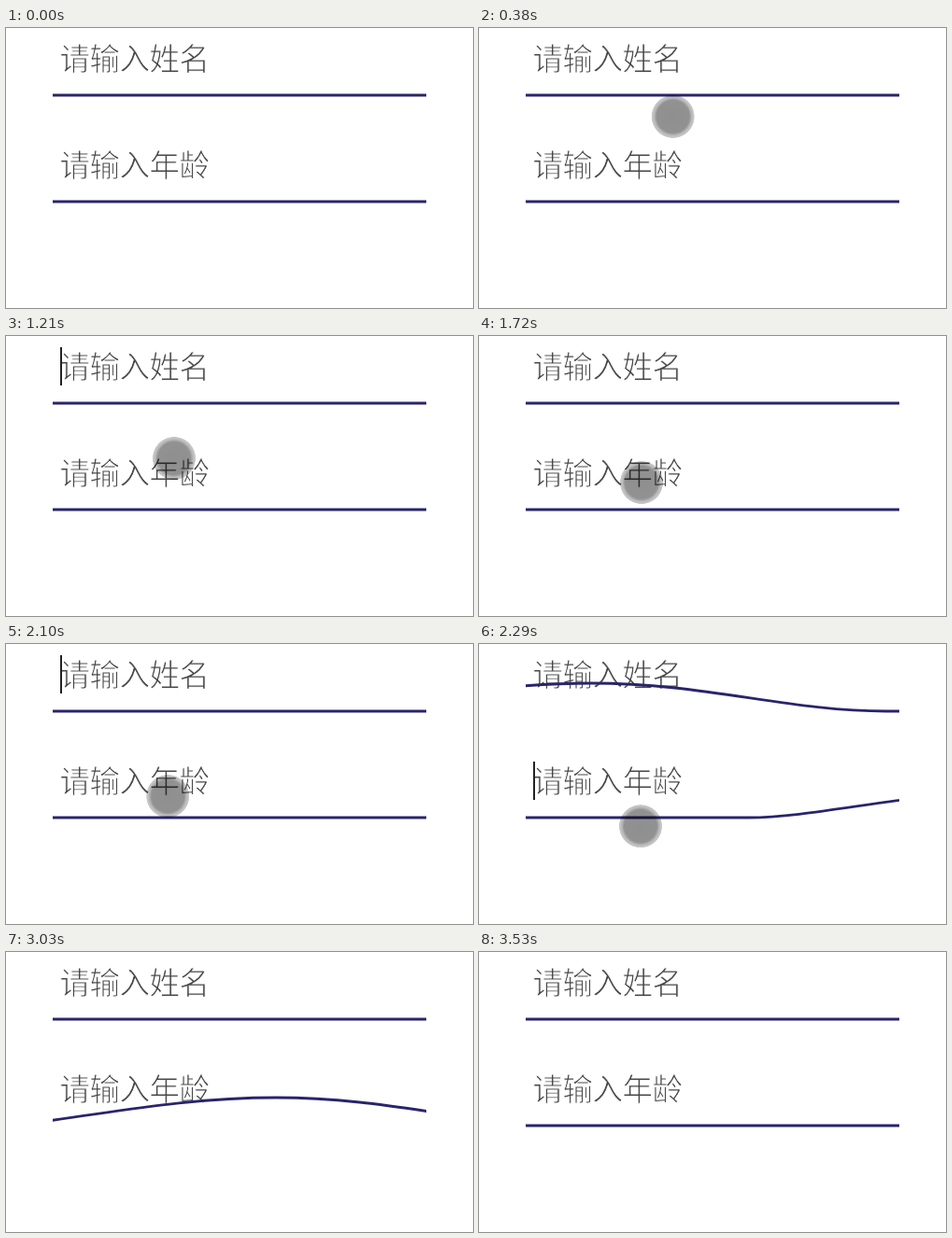
An HTML page for the animation above (3.71 s loop, 500 by 300 pixels).

```html
<!DOCTYPE html>
<html lang="zh-CN">
<head>
<meta charset="utf-8">
<title>Wave inputs</title>
<style>
  html, body { margin: 0; width: 100%; height: 100%; overflow: hidden; background: #fff; }
  svg { display: block; }
  /* The white outline thins the glyphs to a light weight. */
  text {
    font: 300 32.6px "Noto Sans CJK SC", "Noto Sans CJK", sans-serif;
    letter-spacing: -.6px; fill: #484848; stroke: #fff; stroke-width: .9px;
  }
  .wave { fill: none; stroke: #29246c; stroke-width: 1; }
  .caret { fill: #222; }
</style>
</head>
<body>
<svg width="500" height="300" viewBox="0 0 500 300">
  <defs>
    <radialGradient id="spot">
      <stop offset="0" stop-opacity=".44"/>
      <stop offset=".75" stop-opacity=".43"/>
      <stop offset=".87" stop-opacity=".27"/>
      <stop offset=".97" stop-opacity=".21"/>
      <stop offset="1" stop-opacity="0"/>
    </radialGradient>
    <path id="bump" d="M0,0H399.3C448.3,0 514,-10.5 597,-10.5C674.3,-10.5 732,0 798,0H1200"/>
  </defs>
  <g class="field">
    <text x="57.6" y="44.8">请输入姓名</text>
    <rect class="caret" x="58" y="12" width="2" height="41"/>
    <svg x="50" width="400" height="300"><use class="wave" href="#bump"/></svg>
  </g>
  <g class="field" transform="translate(0 114)">
    <text x="57.6" y="44.8">请输入年龄</text>
    <rect class="caret" x="58" y="12" width="2" height="41"/>
    <svg x="50" width="400" height="300"><use class="wave" href="#bump"/></svg>
  </g>
  <circle id="pointer" r="23.3" fill="url(#spot)"/>
</svg>
<script>
const LOOP = 3710, SLIDE = 600, TRAVEL = 1255, BLINK = 540;
const STALL = [520, 710];   // the screen freezes while the first click lands

// Pointer path: time, x, y
const path = [
  [60, 334, 224], [520, 153, 39], [830, 153, 38], [1210, 180, 131],
  [1720, 174, 157], [2220, 173, 165], [2340, 173, 216], [2990, 180, 267]
];

const fields = [
  { focus: 598, blur: 2224, caretFrom: 710 },
  { focus: 2224, blur: 2913, caretFrom: 2224 }
];
document.querySelectorAll(".field").forEach((g, i) => {
  fields[i].wave = g.querySelector(".wave");
  fields[i].caret = g.querySelector(".caret");
});
const pointer = document.getElementById("pointer");

const show = (el, on) => el.setAttribute("visibility", on ? "visible" : "hidden");

// cubic-bezier(0, .25, .5, 1)
function ease(p) {
  if (p <= 0) return 0;
  if (p >= 1) return 1;
  let lo = 0, hi = 1;
  for (let i = 0; i < 24; i++) {
    const u = (lo + hi) / 2;
    if (1.5 * u * u - 0.5 * u ** 3 < p) lo = u; else hi = u;
  }
  const u = lo, v = 1 - u;
  return 0.75 * v * v * u + 3 * v * u * u + u ** 3;
}

function drawField(f, t) {
  const open = ease((t - f.focus) / SLIDE) - ease((t - f.blur) / SLIDE);
  f.wave.setAttribute("transform", `translate(${-TRAVEL * open} 72) scale(1.57 2.857)`);
  const blinks = Math.floor((t - f.caretFrom) / BLINK);
  show(f.caret, t >= f.caretFrom && t < f.blur && blinks % 2 === 0);
}

function drawPointer(t) {
  const i = path.findIndex(k => k[0] > t);
  show(pointer, i > 0);
  if (i <= 0) return;
  const [t0, x0, y0] = path[i - 1], [t1, x1, y1] = path[i];
  const p = (t - t0) / (t1 - t0);
  pointer.setAttribute("transform", `translate(${x0 + (x1 - x0) * p} ${y0 + (y1 - y0) * p})`);
}

function draw(t) {
  if (t > STALL[0] && t < STALL[1]) t = STALL[0];
  fields.forEach(f => drawField(f, t));
  drawPointer(t);
}

const start = performance.now();
function frame() {
  draw((performance.now() - start) % LOOP);
  requestAnimationFrame(frame);
}
frame();
</script>
</body>
</html>
```
